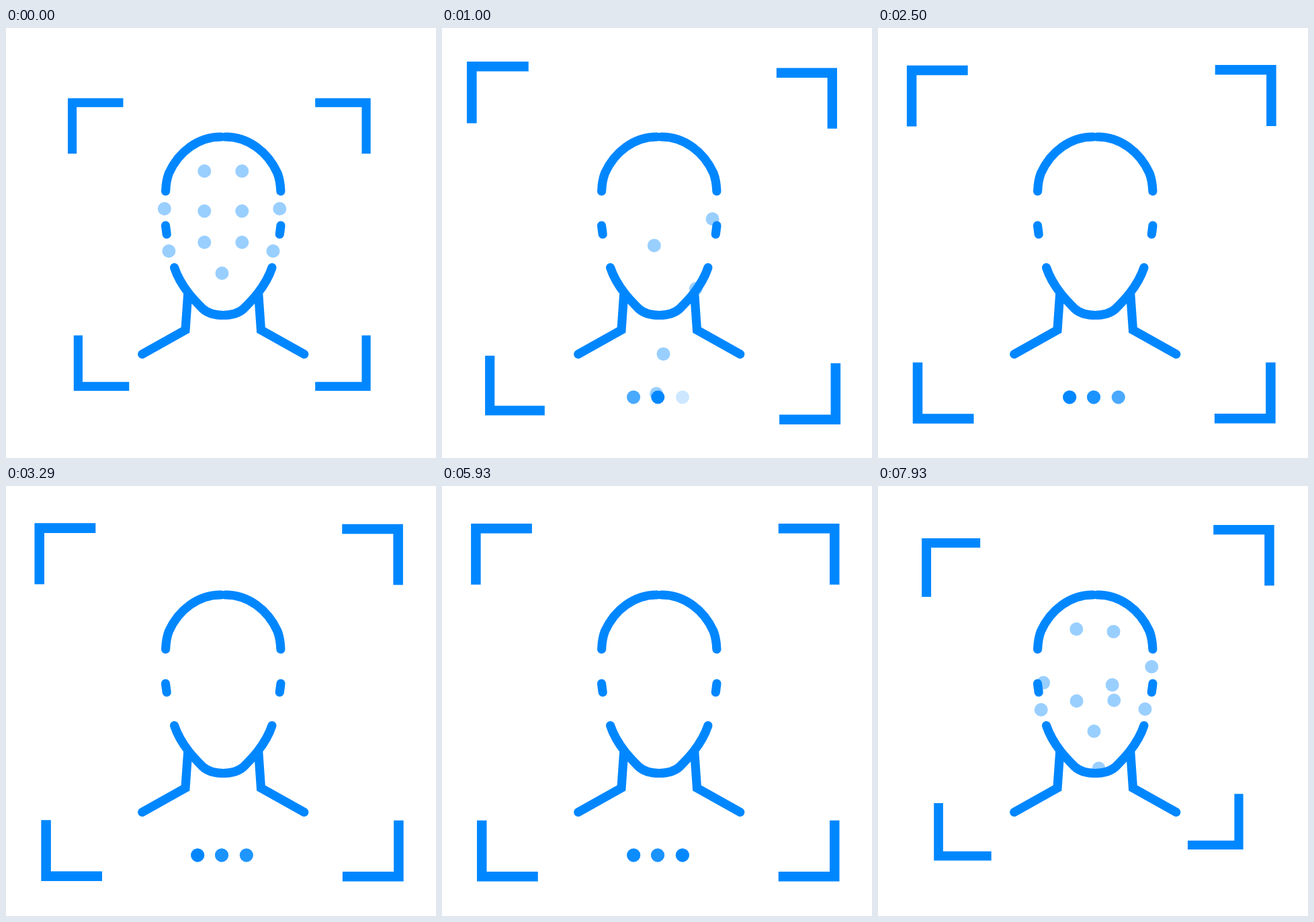
An HTML page with a canvas that plays this animation: 640x640 px, repeating every 8 s.

```html
<!DOCTYPE html>
<html lang="en">
<head>
<meta charset="utf-8">
<title>Face scan</title>
<style>
html, body { margin: 0; width: 100%; height: 100%; overflow: hidden; background: #fff; }
canvas { display: block; width: 100vmin; height: 100vmin; }
</style>
</head>
<body>
<canvas id="stage" width="640" height="640"></canvas>
<script>
const ctx = document.getElementById('stage').getContext('2d');
const LOOP = 8000;
const BLUE = '#0087ff';
const AXIS = 646.5; // mirror: x -> AXIS - x
const REST_Y = 549.5;
const SLOTS = [285, 321, 357.7];

// Corner at rest, arm directions, opening start, spring amount, closing start
const brackets = [
  { x: 92, y: 104.5, dx: 1, dy: 1, open: 20, spring: 0.165, close: 7510 },
  { x: 542.7, y: 104.5, dx: -1, dy: 1, open: 380, spring: 0.09, close: 7820 },
  { x: 100.8, y: 540, dx: 1, dy: -1, open: 500, spring: 0.04, close: 7400 },
  { x: 542.7, y: 540, dx: -1, dy: -1, open: 50, spring: 0.045, close: 7110 }
];

// Home, slot, departure, return; optional return length and hidden-until time
const dots = [
  { x: 295.3, y: 213, slot: 2, out: 651, back: 6308 },
  { x: 351.3, y: 213, slot: 0, out: 60, back: 7035, len: 960 },
  { x: 235.8, y: 269, slot: 2, out: 50, back: 7022, hidden: 2000 },
  { x: 407.3, y: 269, slot: 1, out: 866, back: 6424 },
  { x: 295.3, y: 272.5, slot: 2, out: 70, back: 7395, hidden: 6500 },
  { x: 351.3, y: 272.5, slot: 1, out: 80, back: 7022, hidden: 6500 },
  { x: 295.3, y: 319, slot: 2, out: 40, back: 6859, hidden: 6500 },
  { x: 351.3, y: 319, slot: 1, out: 420, back: 6271 },
  { x: 242.4, y: 332, slot: 1, out: 190, back: 6859 },
  { x: 397.5, y: 332, slot: 1, out: 696, back: 6665 },
  { x: 321.5, y: 365, slot: 0, out: 30, back: 6068 }
];

const clamp = v => Math.min(1, Math.max(0, v));
const ramp = (t, start, len) => clamp((t - start) / len);
const ease = u => (1 - Math.cos(Math.PI * u)) / 2;
const mix = (a, b, p) => a + (b - a) * p;

function circle(x, y, alpha) {
  ctx.globalAlpha = alpha;
  ctx.beginPath();
  ctx.arc(x, y, 10, 0, Math.PI * 2);
  ctx.fill();
  ctx.globalAlpha = 1;
}

function openness(b, t) {
  if (t >= b.close) return 1 - ease(ramp(t, b.close, 900));
  const s = (t - b.open - 750) / 1000;
  if (s < 0) return ease(ramp(t, b.open, 750));
  return 1 + b.spring * Math.sin(5.34 * s) * Math.exp(-0.85 * s);
}

function drawBracket(b, t) {
  const p = openness(b, t);
  const scale = 1 + 0.1 * p;
  const arm = 82.5 * scale;
  const w = 13.2 * scale;
  ctx.save();
  ctx.translate(b.x - b.dx * 48.8 * p, b.y - b.dy * 48.4 * p);
  ctx.scale(b.dx, b.dy);
  ctx.beginPath();
  ctx.moveTo(0, 0);
  ctx.lineTo(arm, 0);
  ctx.lineTo(arm, w);
  ctx.lineTo(w, w);
  ctx.lineTo(w, arm);
  ctx.lineTo(0, arm);
  ctx.fill();
  ctx.restore();
}

function drawDot(d, t) {
  const p = ease(ramp(t, d.out, 900)) - ease(ramp(t, d.back, d.len || 1120));
  const parked = d.hidden && t < d.hidden;
  const alpha = parked ? 0.4 * (1 - ramp(t, d.out + 700, 200)) : 0.4;
  circle(mix(d.x, SLOTS[d.slot], p), mix(d.y, REST_Y, p), alpha);
}

function drawLoader(t) {
  const shown = ramp(t, 700, 200) * (1 - ramp(t, 6300, 200));
  if (!shown) return;
  const phase = ((t - 560) / 895 + 1) % 1;
  [0.15, 0.5, 0.87].forEach((peak, i) => {
    const gap = Math.abs(phase - peak);
    const near = Math.min(gap, 1 - gap);
    const glow = clamp((0.25 - near) / 0.12);
    circle(SLOTS[i] + 0.3, REST_Y, shown * (0.2 + 0.8 * glow));
  });
}

const half = new Path2D(
  'M320 162 C286 162 257 184 242.5 216 C239 225 238 234 237.6 243' +
  'M237.5 294 L239.2 307' +
  'M250.6 356.6 C255 370 265 386 272 395 C279 404 286 411 293 418' +
  'C302 426 312 427.5 323.3 427.5' +
  'M270.8 395 L267 449.5 L202.7 485.5'
);

function drawHead() {
  ctx.lineWidth = 13.2;
  ctx.lineCap = 'round';
  ctx.lineJoin = 'miter';
  ctx.stroke(half);
  ctx.save();
  ctx.translate(AXIS, 0);
  ctx.scale(-1, 1);
  ctx.stroke(half);
  ctx.restore();
}

function draw(t) {
  ctx.fillStyle = '#fff';
  ctx.fillRect(0, 0, 640, 640);
  ctx.fillStyle = ctx.strokeStyle = BLUE;
  dots.forEach(d => drawDot(d, t));
  drawLoader(t);
  drawHead();
  brackets.forEach(b => drawBracket(b, t));
}

const start = performance.now();
function tick() {
  draw((performance.now() - start) % LOOP);
  requestAnimationFrame(tick);
}
tick();
</script>
</body>
</html>
```
